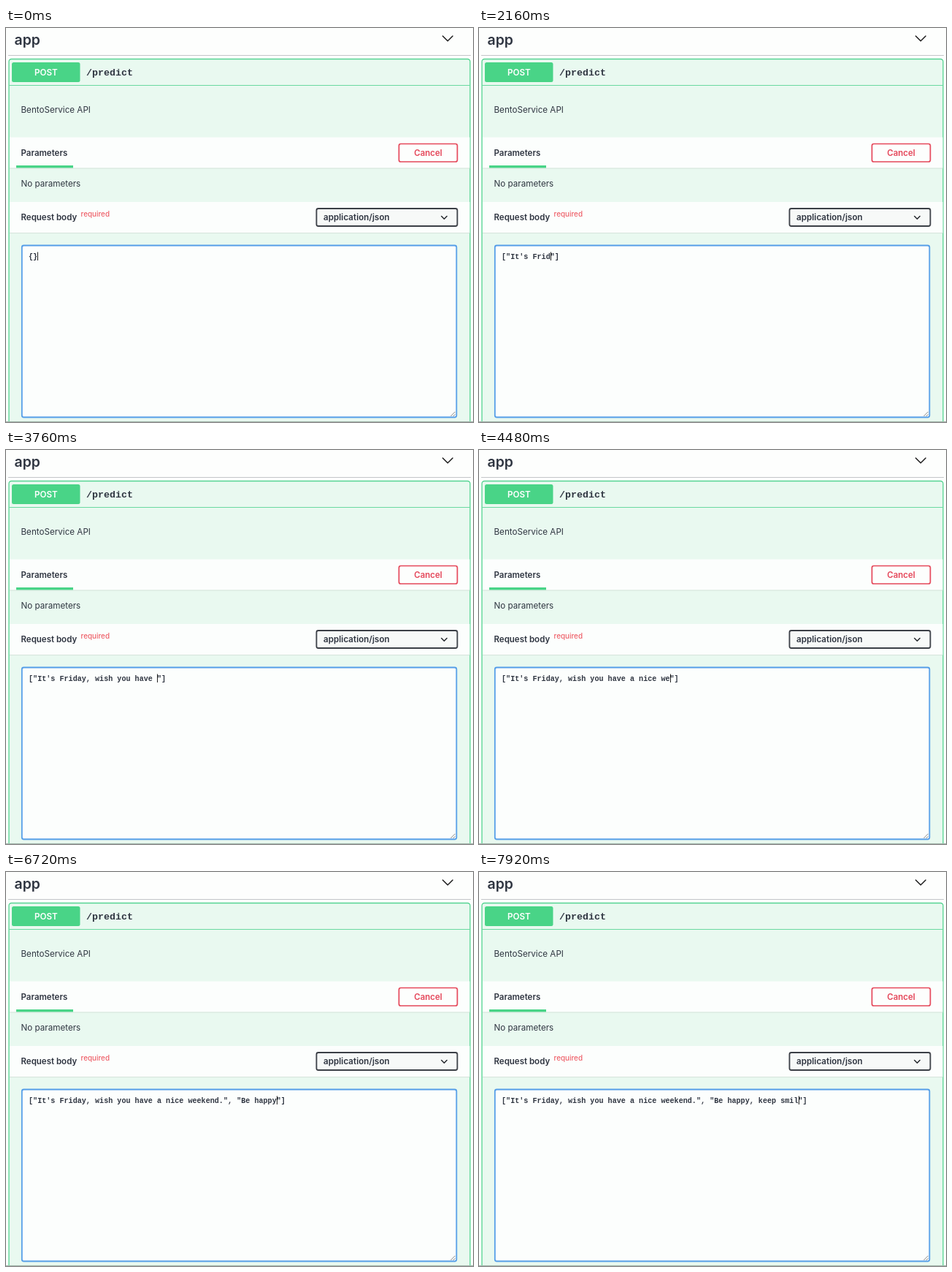
An HTML page for the animation above (8 s loop, 640 px wide and 539 px high).

```html
<!DOCTYPE html>
<html lang="en">
<head>
<meta charset="utf-8">
<title>Request body typing</title>
<style>
  html, body { margin: 0; width: 100%; height: 100%; overflow: hidden; background: #fff; }
  svg { display: block; width: 100vw; height: 100vh; }
  text { font-family: Inter, "Open Sans", sans-serif; font-size: 11.65px; fill: #2f3541; }
  .bold { font-weight: 600; font-size: 11.5px; }
  .mono { font-family: "Liberation Mono", "Courier New", monospace; font-weight: 700; white-space: pre; }
  .line { fill: none; stroke-linecap: round; stroke-linejoin: round; }
</style>
</head>
<body>
<svg viewBox="0 0 640 539" preserveAspectRatio="none">
  <rect width="640" height="539" fill="#fdfefd"/>
  <text x="11.5" y="22.5" style="font-size:19.4px;font-weight:600">app</text>
  <path class="line" d="M598.5 11l6.8 6.8 6.8-6.8" stroke="#1c1c1c" stroke-width="1.5"/>
  <path d="M3 37.5H637" stroke="#c3c6c8"/>

  <rect x="4" y="42.5" width="632" height="520" rx="3.5" fill="#e9f9f0" stroke="#55d492" stroke-width="1.3"/>
  <path d="M4 78.5H636" stroke="#6ad9a0" stroke-width="1.2"/>
  <rect x="8" y="47" width="93.5" height="27" rx="2.5" fill="#49d487"/>
  <text class="bold" x="54.8" y="65" text-anchor="middle" style="fill:#fff;font-size:11.7px">POST</text>
  <text class="mono" x="110" y="65" style="font-size:13.33px">/predict</text>
  <text x="20.5" y="116.3">BentoService API</text>

  <rect x="5" y="149.5" width="630.5" height="42" fill="#fcfefd"/>
  <path d="M5 192H635.5" stroke="#d5e3db"/>
  <rect x="14" y="188" width="78" height="3.4" fill="#49d487"/>
  <text class="bold" x="20.5" y="174.5">Parameters</text>
  <rect x="538.5" y="158.5" width="80" height="24.5" rx="2.5" fill="#fdfefd" stroke="#e5475a" stroke-width="1.7"/>
  <text class="bold" x="578.5" y="174.7" text-anchor="middle" style="fill:#e5475a">Cancel</text>
  <text x="20.5" y="216.5">No parameters</text>

  <rect x="5" y="238" width="630.5" height="42" fill="#fcfefd"/>
  <path d="M5 280.5H635.5" stroke="#d5e3db"/>
  <text class="bold" x="20.5" y="263">Request body</text>
  <text x="102.5" y="258" style="fill:#ee5f68;font-size:9.9px;font-weight:500">required</text>
  <rect x="425.5" y="247" width="193" height="24" rx="2.5" fill="#f7f9f8" stroke="#3b3f46" stroke-width="1.8"/>
  <text class="bold" x="435" y="263" style="font-size:11.7px">application/json</text>
  <path class="line" d="M596.8 257.5l3.7 3.7 3.7-3.7" stroke="#25282d" stroke-width="1.5"/>

  <rect x="21.8" y="297.5" width="595.6" height="235" rx="2.5" fill="#fcfefd" stroke="#559ee8" stroke-width="1.8"/>
  <path d="M609.5 531l6-6M613 531l2.5-2.5" stroke="#777" stroke-width=".9"/>
  <text id="body" class="mono" x="31" y="315.6" style="font-size:10.12px"></text>
  <rect id="caret" y="306.5" width="1" height="11.5" fill="#222"/>
  <path d="M0 538.5H640" stroke="#a3b8ac"/>
</svg>
<script>
const LOOP = 8000, STEP = 80, LEFT = 31, CHAR = 6.073;
const body = document.getElementById('body');
const caret = document.getElementById('caret');

// Each state is the field's content; "|" marks the caret, absent while blinked off.
const states = [
  [0, '{}|'], [80, '{|'], [160, '|'], [320, '[|'], [480, '[]|'], [640, '[|]'],
  [800, '[""|]'], [960, '["|"]'], [1120, '[""]']
];
let before = '["', after = '"]';

const show = time => states.push([time, before + '|' + after]);
const hideCaret = time => states.push([time, before + after]);

// Chunks separated by "/" appear one step apart.
function type(start, chunks) {
  chunks.split('/').forEach((chunk, i) => {
    before += chunk;
    show(start + i * STEP);
  });
}
function moveRight(time) {
  before += after[0];
  after = after.slice(1);
  show(time);
}
function moveLeft(time) {
  after = before.slice(-1) + after;
  before = before.slice(0, -1);
  show(time);
}

type(1360, 'I');
type(1520, 't');
type(1680, "'/s/ /F/r/i/d/a");
type(2480, 'y');
hideCaret(2640);
type(2800, ',/ ');
type(3040, 'w/i/sh/ /y/ou/ /ha/ve/ /a ');
type(3920, 'n/ic');
type(4160, 'e/ /w');
type(4480, 'e/e/k');
type(4800, 'e/n/d.');
moveRight(5120);
type(5280, ',/ ');
type(5600, '"/"');
moveLeft(5920);
type(6000, 'B/e/ ');
type(6320, 'h/a/p/p');
type(6720, 'y/,/ ');
type(7040, 'k');
type(7280, 'e/e/p/ /s');
type(7760, 'm/i/l');

function draw(time) {
  let content = '';
  for (const [start, value] of states) if (start <= time) content = value;
  const column = content.indexOf('|');
  body.textContent = content.replace('|', '');
  caret.setAttribute('visibility', column < 0 ? 'hidden' : 'visible');
  caret.setAttribute('x', Math.round(LEFT + column * CHAR));
}
function tick() {
  draw(performance.now() % LOOP);
  requestAnimationFrame(tick);
}
tick();
</script>
</body>
</html>
```
